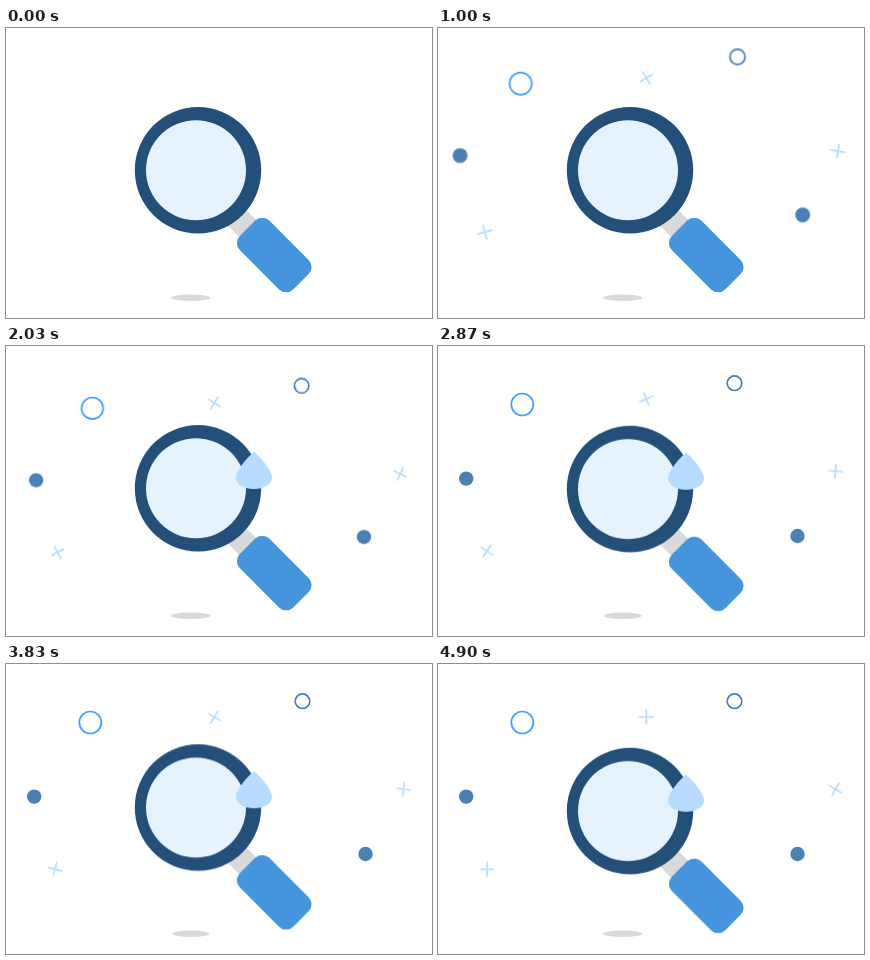
An HTML page that plays this animation: 426 px wide and 290 px high, repeating every 4.93 s.

```html
<!DOCTYPE html>
<html lang="en">
<head>
<meta charset="utf-8">
<title>Search</title>
<style>
  html, body { margin: 0; width: 100%; height: 100%; overflow: hidden; background: #fff; }
  svg { display: block; width: 426px; height: 290px; }

  .anim { animation: 4930ms cubic-bezier(.333, 0, .667, 1) infinite; }
  .linear { animation-timing-function: linear; }

  /* Both bursts grow from a point below the glass */
  .burst { transform-origin: 208px 281px; }
  .outer { animation-name: outer; }
  .inner { animation-name: inner; }
  @keyframes outer {
    0%, 3.39% { transform: scale(0); }
    14.87% { transform: scale(1.15); }
    25.1%, 25.8% { transform: scale(.9); }
    46.65%, 100% { transform: scale(1); }
  }
  @keyframes inner {
    0% { transform: scale(0); }
    0%, 2% { opacity: 0; }
    4%, 100% { opacity: 1; }
    16.23% { transform: scale(1.1); }
    25.1%, 26.6% { transform: scale(.95); }
    47.3%, 100% { transform: scale(1); }
  }

  .spin-top { animation-name: spin-top; }
  .spin-left { animation-name: spin-left; }
  .spin-right { animation-name: spin-right; }
  @keyframes spin-top { 98.03%, 100% { transform: rotate(720deg); } }
  @keyframes spin-left { 98.03%, 100% { transform: rotate(360deg); } }
  @keyframes spin-right { 100% { transform: rotate(936deg); } }

  /* The glass bobs every 500 ms, then rests at the bottom */
  .glass { animation-name: bob; }
  @keyframes bob {
    0%, 20.284%, 40.568%, 60.852%, 81.136% { transform: translateY(0); }
    10.142%, 30.426%, 50.71%, 70.994%, 91.278%, 100% { transform: translateY(4.8px); }
  }
  .shadow { transform-origin: 188px 270px; animation-name: shrink; }
  @keyframes shrink {
    0%, 20.284%, 40.568%, 60.852%, 81.136%, 100% { transform: scaleX(1); }
    10.142%, 30.426%, 50.71%, 70.994%, 91.278% { transform: scaleX(.75); }
  }

  .drop { transform-origin: 248px 105.5px; animation-name: drop; }
  @keyframes drop {
    0%, 22.3% { opacity: 0; transform: scale(.78); }
    32.5%, 100% { opacity: 1; transform: scale(1); }
  }
</style>
</head>
<body>
<svg viewBox="0 0 426 290">
  <defs>
    <path id="cross" d="M-7.5 0H7.5M0 -7.5V7.5" fill="none" stroke="#b8dcff" stroke-width="1.7"/>
  </defs>

  <ellipse class="anim shadow" cx="184.6" cy="269.8" rx="19.8" ry="3.2" fill="#d9d9d9"/>

  <g class="anim burst outer">
    <circle cx="84.3" cy="58.5" r="11" fill="none" stroke="#409fff" stroke-width="1.7"/>
    <g transform="translate(208.3 53)"><use href="#cross" class="anim linear spin-top"/></g>
    <g transform="translate(49 205.2)"><use href="#cross" class="anim linear spin-left"/></g>
    <g transform="translate(397.5 125.2)"><use href="#cross" class="anim linear spin-right"/></g>
  </g>

  <g class="anim burst inner" fill="#4a80b3">
    <circle cx="28.2" cy="132.6" r="7.2"/>
    <circle cx="359.5" cy="190" r="7.2"/>
    <circle cx="296.5" cy="37.2" r="7.3" fill="none" stroke="#4a7cad" stroke-width="1.7"/>
  </g>

  <g class="anim glass">
    <g transform="translate(268.2 227) rotate(45)">
      <rect x="-75" y="-12" width="50" height="24" fill="#d9d9d9"/>
      <rect x="-37.8" y="-20.9" width="75.6" height="41.8" rx="10" fill="#4595dc"/>
    </g>
    <circle cx="192" cy="142.3" r="63.2" fill="#234f78"/>
    <circle cx="190" cy="142.2" r="50" fill="#e6f3ff"/>
    <path class="anim drop" fill="#b8dcff" d="M248 105.5C255 112 266 124 266 131.5C266 139 257 143 248 143S230 139 230 131.5C230 124 241 112 248 105.5Z"/>
  </g>
</svg>
</body>
</html>
```
